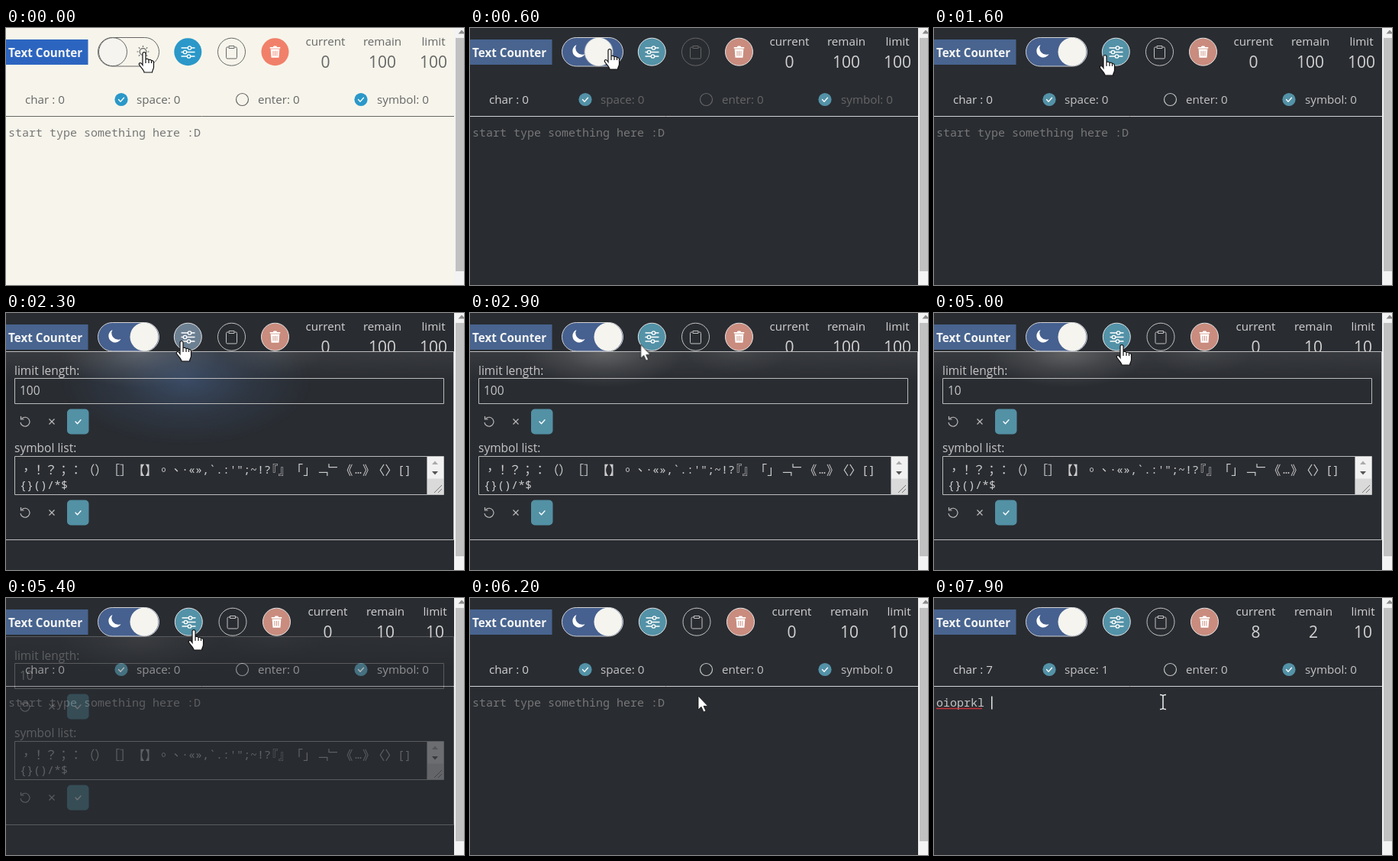
An HTML page for the animation above (8 s loop, 600 by 336 pixels).

```html
<!DOCTYPE html>
<html lang="en">
<head>
<meta charset="utf-8">
<title>Text Counter</title>
<style>
@property --bg { syntax: "<color>"; inherits: true; initial-value: #f7f5eb }
@property --fg { syntax: "<color>"; inherits: true; initial-value: #666 }
@property --late { syntax: "<color>"; inherits: true; initial-value: #666 }
@property --blue { syntax: "<color>"; inherits: true; initial-value: #2b98c9 }
@property --red { syntax: "<color>"; inherits: true; initial-value: #f1806a }
@property --brand { syntax: "<color>"; inherits: true; initial-value: #2c65c0 }
@property --track { syntax: "<color>"; inherits: true; initial-value: #f7f5eb }
@property --edge { syntax: "<color>"; inherits: true; initial-value: #e6e6e600 }
@property --n { syntax: "<integer>"; inherits: true; initial-value: 0 }
@property --lim { syntax: "<integer>"; inherits: true; initial-value: 0 }
@property --val { syntax: "<integer>"; inherits: true; initial-value: 0 }
@property --cur { syntax: "<integer>"; inherits: true; initial-value: 0 }

html, body { margin: 0; width: 100%; height: 100%; overflow: hidden }
svg {
  display: block; width: 600px; height: 336px;
  font: 15.2px "Open Sans", "Noto Sans", sans-serif;
  animation: theme 8s linear infinite, late 8s linear infinite, type 8s step-end infinite,
    limit 8s step-end infinite, value 8s step-end infinite, pointer 8s step-end infinite;
}
@keyframes theme {
  0%, 1.25% { --bg: #f7f5eb; --fg: #666; --blue: #2b98c9; --red: #f1806a; --brand: #2c65c0; --track: #f7f5eb; --edge: #e6e6e600 }
  7.25%, 100% { --bg: #292c31; --fg: #d2d2d2; --blue: #5392a7; --red: #c98c7e; --brand: #48648f; --track: #46608f; --edge: #e6e6e6 }
}
@keyframes late { 0%, 8.5% { --late: #666 } 16%, 100% { --late: #c4c4c4 } }
@keyframes type {
  0% { --n: 0 } 85% { --n: 1 } 87.5% { --n: 2 } 88.75% { --n: 3 } 90% { --n: 4 }
  92.5% { --n: 5 } 93.75% { --n: 6 } 95% { --n: 7 } 97.5%, 100% { --n: 8 }
}
@keyframes limit { 0% { --lim: 0 } 55%, 100% { --lim: 1 } }
@keyframes value { 0% { --val: 0 } 47.5%, 100% { --val: 1 } }
@keyframes pointer {
  0% { --cur: 0 } 36.25% { --cur: 1 } 40% { --cur: 2 } 50% { --cur: 1 } 53.25% { --cur: 0 }
  70% { --cur: 1 } 80%, 100% { --cur: 2 }
}

/* shows only the child whose --k equals --v */
.pick > * { opacity: calc(1 - (var(--v) - var(--k)) * (var(--v) - var(--k))) }
.shift { transform: translateX(calc(var(--lim) * var(--s) * 1px)) }
.fg { fill: var(--fg) }
.late { fill: var(--late) }
.mid { text-anchor: middle }
.big { font-size: 21px }
.mono { font: 15px "Noto Sans Mono", "DejaVu Sans Mono", monospace; white-space: pre }
.cjk {
  font: 16.4px "Noto Sans CJK TC", "Noto Sans CJK", sans-serif;
  font-kerning: none; font-feature-settings: "chws" 0, "halt" 0, "kern" 0; text-spacing-trim: space-all;
}
.line { fill: none; stroke: #fff; stroke-width: 1.3; stroke-linecap: round; stroke-linejoin: round }
.tool { stroke: var(--edge) }

#knob { fill: #f5f4ee; stroke: var(--fg); animation: knob 8s infinite }
@keyframes knob {
  0%, 2.5% { transform: none; stroke-opacity: 1; animation-timing-function: ease-in-out }
  10.6%, 100% { transform: translateX(41px); stroke-opacity: 0 }
}
#set { fill: var(--blue); animation: hover 8s infinite linear }
@keyframes hover { 0%, 22.5% { fill: var(--blue) } 25%, 31% { fill: #6c8092 } 35%, 100% { fill: var(--blue) } }
#panel { animation: panel 8s infinite linear }
@keyframes panel { 0%, 23.75% { opacity: 0 } 27.5%, 65% { opacity: 1 } 68.75%, 100% { opacity: 0 } }
#glow { animation: glow 8s infinite linear }
@keyframes glow { 0%, 30% { opacity: 1 } 34%, 100% { opacity: 0 } }
#focus { animation: focus 8s infinite step-end }
@keyframes focus { 0% { opacity: 0 } 42.5% { opacity: 1 } 55%, 100% { opacity: 0 } }
#caret { transform: translateX(calc(var(--n) * 9px)) }
#caret rect { animation: caret 8s infinite step-end }
@keyframes caret { 0% { opacity: 0 } 81.25%, 100% { opacity: 1 } }
#mouse { --v: var(--cur); animation: mouse 8s infinite ease-in-out }
@keyframes mouse {
  0% { transform: translate(181px, 32px) }
  5%, 12.5% { transform: translate(183px, 28px) }
  22.5%, 35% { transform: translate(230px, 37px) }
  42.5%, 48.75% { transform: translate(119px, 112px) }
  51.5% { transform: translate(104px, 178px) }
  54%, 57.5% { transform: translate(95px, 140px) }
  62.5%, 68.5% { transform: translate(246px, 42px) }
  77.5% { transform: translate(299px, 128px) }
  80%, 100% { transform: translate(300px, 136px) }
}
</style>
</head>
<body>
<svg viewBox="0 0 600 336">
  <defs>
    <radialGradient id="cool"><stop stop-color="#49658f" stop-opacity=".55"/><stop offset=".5" stop-color="#49658f" stop-opacity=".2"/><stop offset="1" stop-color="#49658f" stop-opacity="0"/></radialGradient>
    <radialGradient id="warm"><stop stop-color="#8a8a8a" stop-opacity=".5"/><stop offset=".5" stop-color="#888" stop-opacity=".2"/><stop offset="1" stop-color="#888" stop-opacity="0"/></radialGradient>
    <linearGradient id="haze" x2="0" y2="1"><stop stop-color="#888" stop-opacity=".16"/><stop offset="1" stop-color="#888" stop-opacity="0"/></linearGradient>
    <clipPath id="inside"><path d="M0 50H587V297H0z"/></clipPath>
    <path id="tick" class="line" stroke-width="1.5" d="M-3.5 0l2.5 2.7 4.5-5"/>
    <g id="actions" fill="none" stroke="#bbb" stroke-width="1.2">
      <path d="M-4.3-4A6 6 0 1 1-6 1M-5.500-7v4h4" transform="translate(25 0)"/>
      <path d="M56.500-3.500l7 7m0-7l-7 7"/>
      <rect x="80" y="-16.500" width="28.500" height="33" rx="5" fill="#5391a5" stroke="none"/>
      <use href="#tick" x="94.500"/>
    </g>
  </defs>

  <rect width="600" height="336" style="fill:var(--bg)"/>

  <!-- header -->
  <rect y="15" width="107.5" height="33" style="fill:var(--brand)"/>
  <text x="3" y="37.5" fill="#f4f4f4" font-weight="700">Text Counter</text>
  <rect x="120.5" y="12.5" width="80" height="37.5" rx="18.75" style="fill:var(--track);stroke:var(--fg)"/>
  <path d="M139.5 22a8.6 8.6 0 1 0 11 12 8.6 8.6 0 0 1-11-12z" fill="#fff"/>
  <g fill="none" stroke="#666" stroke-width="1.2">
    <circle cx="179.5" cy="31" r="4.3"/>
    <path d="M179.5 23v2M179.5 37v2M171.5 31h2M185.5 31h2M173.8 25.3l1.5 1.5M183.7 35.2l1.5 1.5M173.8 36.7l1.5-1.5M183.7 26.8l1.5-1.5"/>
  </g>
  <circle id="knob" cx="140" cy="31.2" r="18.5"/>

  <g class="shift" style="--s:1">
    <circle id="set" class="tool" cx="238.3" cy="31.2" r="18"/>
    <g class="line">
      <path d="M230 26h8m5 0h4M230 31.500h2m5 0h10M230 37h7m5 0h5"/>
      <circle cx="240.5" cy="26" r="2.200"/><circle cx="234.5" cy="31.5" r="2.200"/><circle cx="239.5" cy="37" r="2.200"/>
    </g>
  </g>
  <g class="shift" style="--s:1.5;fill:none;stroke:var(--late)">
    <circle cx="295.5" cy="31.2" r="18"/>
    <path d="M291.5 25h-1.5a1.500 1.500 0 0 0-1.500 1.500v12a1.500 1.500 0 0 0 1.500 1.500h11a1.500 1.500 0 0 0 1.500-1.500v-12a1.500 1.500 0 0 0-1.500-1.500h-1.500M292 23.500h7v3h-7z"/>
  </g>
  <g class="shift" style="--s:2">
    <circle class="tool" cx="352.5" cy="31.2" r="18" style="fill:var(--red)"/>
    <g transform="translate(352.5 31.2) scale(.9)">
      <path d="M-7.500-7H-3l1-1.500h4l1 1.500h4.500v2h-15zM-6.500-4h13l-1 12.500h-11z" fill="#fff"/>
      <path d="M-2.700-1.500V6M0-1.500V6M2.700-1.500V6" style="stroke:var(--red)"/>
    </g>
  </g>

  <g class="fg mid">
    <g class="shift" style="--s:3">
      <text x="418.5" y="23">current</text>
      <g class="pick big" style="--v:var(--n)" data-at="418.5,52" data-list="0|1|2|3|4|5|6|7|8"></g>
    </g>
    <g class="shift" style="--s:4">
      <text x="493" y="23">remain</text>
      <g class="pick big" style="--v:(var(--n) + var(--lim))" data-at="493,52" data-list="100|10|9|8|7|6|5|4|3|2"></g>
    </g>
    <g class="shift" style="--s:2">
      <text x="560" y="23">limit</text>
      <g class="pick big" style="--v:var(--lim)" data-at="560,52" data-list="100|10"></g>
    </g>
  </g>

  <!-- counts -->
  <g class="pick fg" style="--v:min(7, var(--n))" data-at="25,99" data-list="char : 0|char : 1|char : 2|char : 3|char : 4|char : 5|char : 6|char : 7"></g>
  <g style="fill:var(--blue)"><circle cx="151" cy="93.5" r="8.6"/><circle cx="465" cy="93.5" r="8.6"/></g>
  <use href="#tick" x="151" y="93.5"/><use href="#tick" x="465" y="93.5"/>
  <circle cx="309.5" cy="93.5" r="8" fill="none" stroke-width="1.2" style="stroke:var(--late)"/>
  <g class="late">
    <g class="pick" style="--v:max(0, var(--n) - 7)" data-at="171,99" data-list="space: 0|space: 1"></g>
    <text x="330" y="99">enter: 0</text>
    <text x="486" y="99">symbol: 0</text>
  </g>
  <path d="M0 115.5H587" style="stroke:var(--fg)"/>

  <!-- text area -->
  <text class="mono" x="3" y="141.5" fill="#777" style="opacity:calc(1 - var(--n))">start type something here :D</text>
  <g id="word" class="mono" fill="#c6c6c6"></g>
  <path d="M3 144.5h60" stroke="#c8333a" stroke-width="1.5" style="opacity:calc(var(--n) - 7)"/>
  <g id="caret"><rect x="3" y="128.5" width="1.5" height="17" fill="#e4e4e4"/></g>

  <!-- settings -->
  <g id="panel">
    <path d="M-1 50.5H586.5V296.5H-1z" fill="#292c31"/>
    <g clip-path="url(#inside)">
      <rect y="50" width="587" height="40" fill="url(#haze)"/>
      <ellipse cx="175" cy="52" rx="105" ry="46" fill="url(#warm)"/>
      <ellipse cx="350" cy="48" rx="70" ry="32" fill="url(#warm)" opacity=".4"/>
      <ellipse id="glow" cx="236" cy="88" rx="165" ry="85" fill="url(#cool)"/>
    </g>
    <path d="M-1 50.5H586.5V296.5H-1z" fill="none" stroke="#bbb"/>
    <g fill="#c6c6c6" font-size="15.5">
      <text x="11" y="80.5">limit length:</text>
      <text x="11" y="182">symbol list:</text>
      <g class="pick" style="--v:var(--val)" data-at="18,106.5" data-list="100|10"></g>
    </g>
    <path d="M11.5 85.5H573.5V118.5H11.5zM11.5 187.5H573.5V237.5H11.5z" fill="none" stroke="#bbb"/>
    <g id="focus">
      <rect x="11.5" y="86" width="562" height="32.5" rx="2" fill="none" stroke="#16181b" stroke-width="2"/>
      <rect x="10.5" y="85" width="564" height="34.5" rx="3" fill="none" stroke="#f4f4f4" stroke-width="1.4"/>
      <path d="M548 92h19v19h-19z" fill="#efefef"/>
      <path d="M553.5 99.5l4-4.500 4 4.500zM553.5 103.5l4 4.500 4-4.500z" fill="#444"/>
    </g>
    <use href="#actions" y="142"/>
    <use href="#actions" y="261"/>
    <g lang="zh-TW" fill="#cdcdcd">
      <text class="cjk" x="18" y="211">，！？；：（）［］【】。、</text>
      <text class="mono" x="230" y="210">·«»,`.:'";~!?</text>
      <text class="cjk" x="340" y="211">『』「」﹁﹂</text>
      <text class="cjk" x="438" y="211">《</text>
      <text class="mono" x="457" y="210">…</text>
      <text class="cjk" x="467" y="211">》</text>
      <text class="cjk" x="480" y="211">〈〉</text>
      <text class="mono" x="513" y="210">[]</text>
      <text class="mono" x="18" y="229.5">{}()/*$</text>
    </g>
    <path d="M551.5 188H573V237H551.5z" fill="#f1f1f1"/>
    <path d="M552 216.5H573V237H552z" fill="#dadada"/>
    <path d="M558 198l4-4.500 4 4.500z" fill="#aaa"/>
    <path d="M558 207l4 4.500 4-4.500z" fill="#555"/>
    <path d="M561 235l10-10M566 235l5-5" stroke="#777"/>
  </g>

  <!-- page scrollbar -->
  <path d="M587 0H600V336H587z" fill="#f3f3f3"/>
  <path d="M589 13H600V318H589z" fill="#c1c1c1"/>
  <path d="M592.5 7.5l4.500-5 4.500 5z" fill="#8a8a8a"/>

  <g id="mouse" class="pick">
    <path style="--k:0" d="M-2 1.500C-2-1 2-1 2 1.500V9c0-1 4-1 4 1 0-1 3.500-1 3.500 1 0-1 3-.500 3 2v6c0 3-2 4-2 7H0c0-3-5-7-6.500-10-1-2 1.500-3.500 3.500-1l1 1.500zM2 9v5M6 10v4M9.500 11v3" fill="#fff" stroke="#111" stroke-width="1.2"/>
    <path style="--k:1" d="M0 0V18l4-3.700 3 6.700 3-1.300-3-6.400h5.600z" fill="#fff" stroke="#111" stroke-width=".8"/>
    <path style="--k:2" d="M-4-9.500q4 0 4 2 0-2 4-2M0-8V8M-4 9.500q4 0 4-2 0 2 4 2" fill="none" stroke="#eee" stroke-width="1.5"/>
  </g>
</svg>
<script>
const label = (text, x, y, style) => `<text x="${x}" y="${y}" style="${style}">${text}</text>`;

// one text per possible value; CSS picks the visible one
for (const g of document.querySelectorAll("[data-list]")) {
  const [x, y] = g.dataset.at.split(",");
  g.innerHTML = g.dataset.list.split("|").map((s, k) => label(s, x, y, `--k:${k}`)).join("");
}

// letters appear as the typed count passes them
document.getElementById("word").innerHTML = [..."oioprkl"]
  .map((c, i) => label(c, 3 + i * 9, 141.5, `opacity:calc(var(--n) - ${i})`))
  .join("");
</script>
</body>
</html>
```
